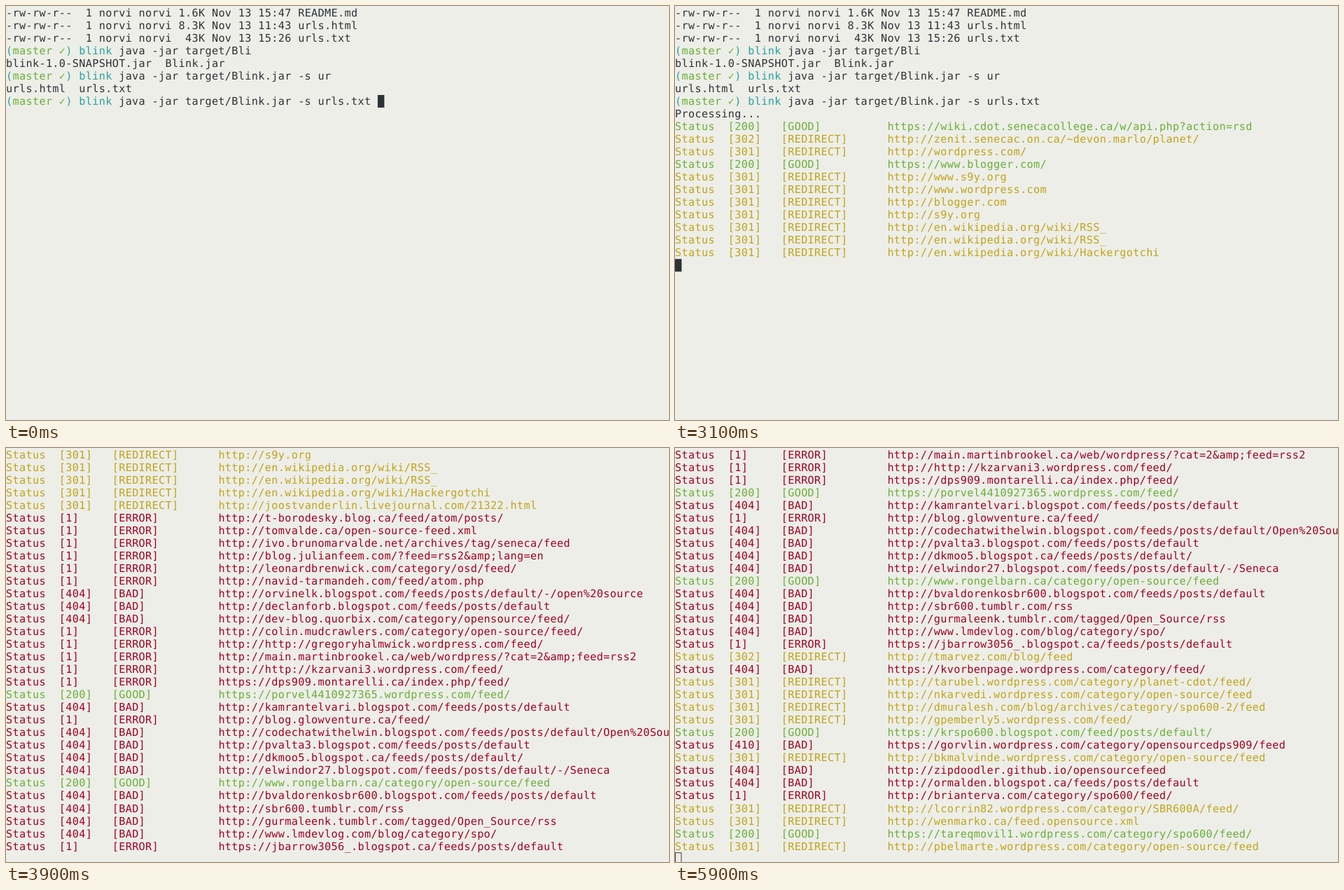
An HTML page that plays this animation: 947x591 px, repeating every 6.1 s.

```html
<!DOCTYPE html>
<html lang="en">
<head>
<meta charset="utf-8">
<title>Link checker in a terminal</title>
<style>
  html, body { margin: 0; width: 100%; height: 100%; overflow: hidden; background: #edeee8; }
  svg { display: block; width: 947px; height: 591px; overflow: hidden; }
  text {
    font: 16px "DejaVu Sans Mono", monospace;
    letter-spacing: .368px;
    white-space: pre;
    text-rendering: geometricPrecision;
    fill: #2e3236;
  }
  .teal { fill: #2aa19c; }
  .green { fill: #6aae38; }
  .yellow { fill: #c0a41a; }
  .red { fill: #a2001f; }
  #cursor { fill: #2e3236; }
  #cursor.hollow { fill: none; stroke: #2e3236; }
  #pointer { fill: #2e3236; stroke: #f8f8f5; stroke-width: .8; filter: drop-shadow(1px 1px 1px #0005); }
</style>
</head>
<body>
<svg viewBox="0 0 947 591">
  <g transform="scale(.948)">
    <g id="screen"></g>
    <rect id="cursor"/>
  </g>
  <path id="pointer" d="M0 0V14.8L3.4 11.7L5.9 17.4L8.3 16.4L5.8 10.8H10.4Z"/>
</svg>
<script>
// Terminal cells are 10 x 19 units; the whole screen is scaled to the stage
const LOOP = 6100, CELL = 10, ROW = 19, TOP = 1, BASELINE = 15, VISIBLE_ROWS = 32;
const PROMPT_COLUMN = 56;

const listing = [
  "-rw-rw-r--  1 norvi norvi 1.6K Nov 13 15:47 README.md",
  "-rw-rw-r--  1 norvi norvi 8.3K Nov 13 11:43 urls.html",
  "-rw-rw-r--  1 norvi norvi  43K Nov 13 15:26 urls.txt",
  "$java -jar target/Bli",
  "blink-1.0-SNAPSHOT.jar  Blink.jar",
  "$java -jar target/Blink.jar -s ur",
  "urls.html  urls.txt",
  "$java -jar target/Blink.jar -s urls.txt",
  "Processing..."
];

const results = `
200 https://wiki.cdot.senecacollege.ca/w/api.php?action=rsd
302 http://zenit.senecac.on.ca/~devon.marlo/planet/
301 http://wordpress.com/
200 https://www.blogger.com/
301 http://www.s9y.org
301 http://www.wordpress.com
301 http://blogger.com
301 http://s9y.org
301 http://en.wikipedia.org/wiki/RSS_
301 http://en.wikipedia.org/wiki/RSS_
301 http://en.wikipedia.org/wiki/Hackergotchi
301 http://joostvanderlin.livejournal.com/21322.html
1 http://t-borodesky.blog.ca/feed/atom/posts/
1 http://tomvalde.ca/open-source-feed.xml
1 http://ivo.brunomarvalde.net/archives/tag/seneca/feed
1 http://blog.julianfeem.com/?feed=rss2&amp;lang=en
1 http://leonardbrenwick.com/category/osd/feed/
1 http://navid-tarmandeh.com/feed/atom.php
404 http://orvinelk.blogspot.com/feeds/posts/default/-/open%20source
404 http://declanforb.blogspot.com/feeds/posts/default
404 http://dev-blog.quorbix.com/category/opensource/feed/
1 http://colin.mudcrawlers.com/category/open-source/feed/
1 http://http://gregoryhalmwick.wordpress.com/feed/
1 http://main.martinbrookel.ca/web/wordpress/?cat=2&amp;feed=rss2
1 http://http://kzarvani3.wordpress.com/feed/
1 https://dps909.montarelli.ca/index.php/feed/
200 https://porvel4410927365.wordpress.com/feed/
404 http://kamrantelvari.blogspot.com/feeds/posts/default
1 http://blog.glowventure.ca/feed/
404 http://codechatwithelwin.blogspot.com/feeds/posts/default/Open%20Source
404 http://pvalta3.blogspot.com/feeds/posts/default
404 http://dkmoo5.blogspot.ca/feeds/posts/default/
404 http://elwindor27.blogspot.com/feeds/posts/default/-/Seneca
200 http://www.rongelbarn.ca/category/open-source/feed
404 http://bvaldorenkosbr600.blogspot.com/feeds/posts/default
404 http://sbr600.tumblr.com/rss
404 http://gurmaleenk.tumblr.com/tagged/Open_Source/rss
404 http://www.lmdevlog.com/blog/category/spo/
1 https://jbarrow3056_.blogspot.ca/feeds/posts/default
302 http://tmarvez.com/blog/feed
404 https://kvorbenpage.wordpress.com/category/feed/
301 http://tarubel.wordpress.com/category/planet-cdot/feed/
301 http://nkarvedi.wordpress.com/category/open-source/feed
301 http://dmuralesh.com/blog/archives/category/spo600-2/feed
301 http://gpemberly5.wordpress.com/feed/
200 https://krspo600.blogspot.com/feed/posts/default/
410 https://gorvlin.wordpress.com/category/opensourcedps909/feed
301 http://bkmalvinde.wordpress.com/category/open-source/feed
404 http://zipdoodler.github.io/opensourcefeed
404 http://ormalden.blogspot.ca/feeds/posts/default
1 http://brianterva.com/category/spo600/feed/
301 http://lcorrin82.wordpress.com/category/SBR600A/feed/
301 http://wenmarko.ca/feed.opensource.xml
200 https://tareqmovil1.wordpress.com/category/spo600/feed/
301 http://pbelmarte.wordpress.com/category/open-source/feed`.trim().split("\n");

const kinds = {
  0: ["ERROR", "red"], 2: ["GOOD", "green"], 3: ["REDIRECT", "yellow"], 4: ["BAD", "red"]
};

// Time, printed lines, cursor style
const steps = [
  [0, 8, "solid"], [600, 8, ""], [1200, 8, "solid"], [1600, 8, "solid"],
  [1700, 9, "solid"], [2200, 9, ""], [2600, 12, ""], [2800, 12, "solid"],
  [3100, 20, "solid"], [3300, 26, ""], [3400, 32, ""], [3600, 38, ""],
  [3700, 43, ""], [3800, 46, ""], [3900, 48, ""], [4100, 49, "solid"],
  [4200, 53, "solid"], [4400, 59, "solid"], [4500, 64, "solid"],
  [5200, 64, ""], [5800, 64, "solid"], [5900, 64, "hollow"]
];

// Time, pointer tip
const pointerSteps = [
  [0], [4500, 63, 143], [4600, 70, 91], [4800, 69, 58],
  [4900, 66, 27], [5000, 62, 1], [5200]
];

const screen = document.getElementById("screen");
const cursor = document.getElementById("cursor");
const pointer = document.getElementById("pointer");

function addText(row, column, content, color = "") {
  const node = document.createElementNS("http://www.w3.org/2000/svg", "text");
  node.setAttribute("x", column * CELL);
  node.setAttribute("y", TOP + BASELINE + row * ROW);
  node.setAttribute("class", color);
  node.textContent = content;
  rows[row].append(node);
}

const rows = Array.from({ length: listing.length + results.length }, () => {
  const group = document.createElementNS("http://www.w3.org/2000/svg", "g");
  return screen.appendChild(group);
});

listing.forEach((line, row) => {
  if (line[0] !== "$") return addText(row, 0, line);
  addText(row, 0, "(", "teal");
  addText(row, 1, "master ✓", "green");
  addText(row, 9, ") blink", "teal");
  addText(row, 17, line.slice(1));
});

results.forEach((line, i) => {
  const [code, url] = line.split(" ");
  const [label, color] = kinds[Math.floor(code / 100)];
  const columns = `Status  [${code}]`.padEnd(16) + `[${label}]`.padEnd(16);
  addText(listing.length + i, 0, columns + url, color);
});

const current = (list, time) => list.findLast(step => step[0] <= time);

function setCursor(style, column, row) {
  const inset = style === "hollow" ? 0.5 : 0;
  const box = {
    x: column * CELL + inset,
    y: TOP + row * ROW + inset,
    width: CELL - 2 * inset,
    height: ROW - 2 * inset
  };
  for (const key in box) cursor.setAttribute(key, box[key]);
  cursor.setAttribute("class", style);
  cursor.style.display = style ? "" : "none";
}

function render(time) {
  const [, printed, style] = current(steps, time);
  const scroll = Math.max(0, printed - VISIBLE_ROWS);
  rows.forEach((group, i) => {
    group.style.display = i >= scroll && i < printed ? "" : "none";
  });
  screen.setAttribute("transform", `translate(0 ${-scroll * ROW})`);

  if (time < 1600) setCursor(style, PROMPT_COLUMN, printed - 1);
  else setCursor(style, 0, printed - scroll);

  const [, x, y] = current(pointerSteps, time);
  pointer.style.display = x === undefined ? "none" : "";
  if (x !== undefined) pointer.setAttribute("transform", `translate(${x} ${y})`);
}

const start = performance.now();
function tick() {
  render((performance.now() - start) % LOOP);
  requestAnimationFrame(tick);
}
tick();
</script>
</body>
</html>
```
